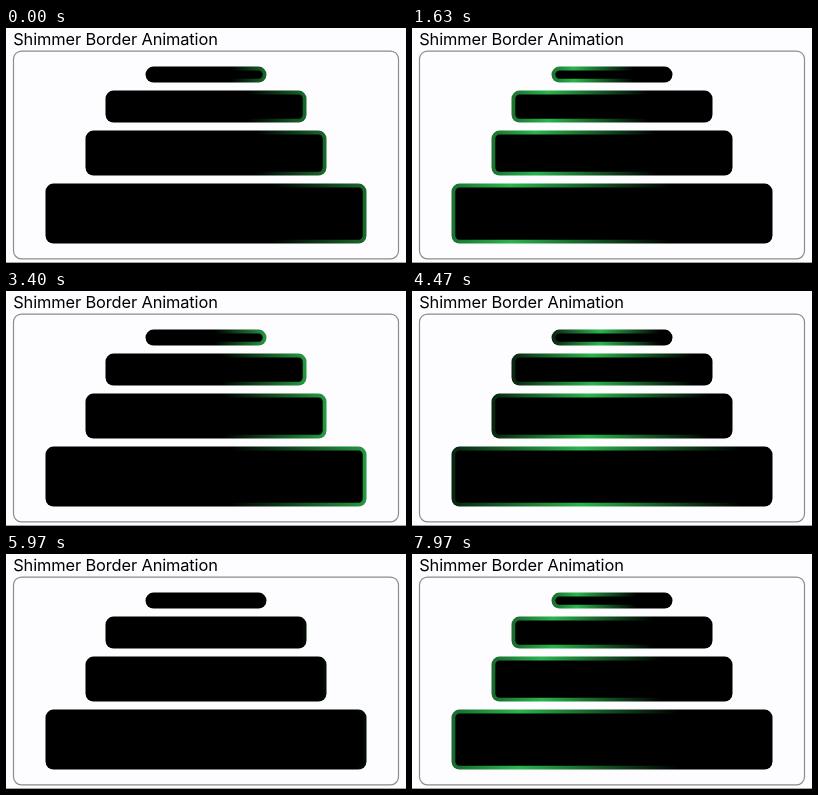
These frames come from a looping animation (400 px wide and 235 px high, 8000 ms). An HTML page:

```html
<!DOCTYPE html>
<html lang="en">
<head>
<meta charset="utf-8">
<title>Shimmer Border Animation</title>
<style>
  html, body { margin: 0; width: 100%; height: 100%; overflow: hidden; background: #fdfcfe; }
  svg { display: block; width: 400px; height: 235px; }
  text { font: 16.4px Inter, sans-serif; letter-spacing: -0.12px; }
</style>
</head>
<body>
<svg viewBox="0 0 400 235">
  <defs>
    <linearGradient id="shimmer">
      <stop offset="0" stop-color="#000"/>
      <stop offset="0.5" stop-color="#2ab44c"/>
      <stop offset="1" stop-color="#000"/>
    </linearGradient>
  </defs>
  <text x="7.2" y="16.8">Shimmer Border Animation</text>
  <rect x="7.5" y="23.1" width="385" height="207.7" rx="8" fill="none" stroke="#8c8b8e" stroke-width="1.2"/>
  <rect y="234" width="400" height="1" fill="#a5a4a7"/>
  <g id="bars"></g>
</svg>
<script>
const LOOP = 8000, SWEEP = 3190, SWEEP_OFFSET = 470;
const BORDER = 3.8, RADIUS = 8, GAP = 8, FIRST_TOP = 38.6;
const shimmer = document.getElementById('shimmer');
const bars = document.getElementById('bars');

function addRect(x, y, width, height, rx, fill) {
  const rect = document.createElementNS('http://www.w3.org/2000/svg', 'rect');
  for (const [name, value] of Object.entries({ x, y, width, height, rx, fill })) {
    rect.setAttribute(name, value);
  }
  bars.append(rect);
}

let barTop = FIRST_TOP;
for (const [width, height] of [[121, 16], [201, 32], [241, 45], [321, 60]]) {
  const left = 200 - width / 2;
  addRect(left, barTop, width, height, RADIUS, 'url(#shimmer)');
  addRect(left + BORDER, barTop + BORDER, width - 2 * BORDER, height - 2 * BORDER,
    RADIUS - BORDER, '#000');
  barTop += height + GAP;
}

// The band is as wide as a bar and sweeps from just right of it to just left.
function draw(time) {
  const progress = ((time % LOOP + SWEEP_OFFSET) % SWEEP) / SWEEP;
  const start = 1 - 2 * progress;
  shimmer.setAttribute('x1', start);
  shimmer.setAttribute('x2', start + 1);
}

const began = performance.now();
function tick() {
  draw(performance.now() - began);
  requestAnimationFrame(tick);
}
tick();
</script>
</body>
</html>
```
